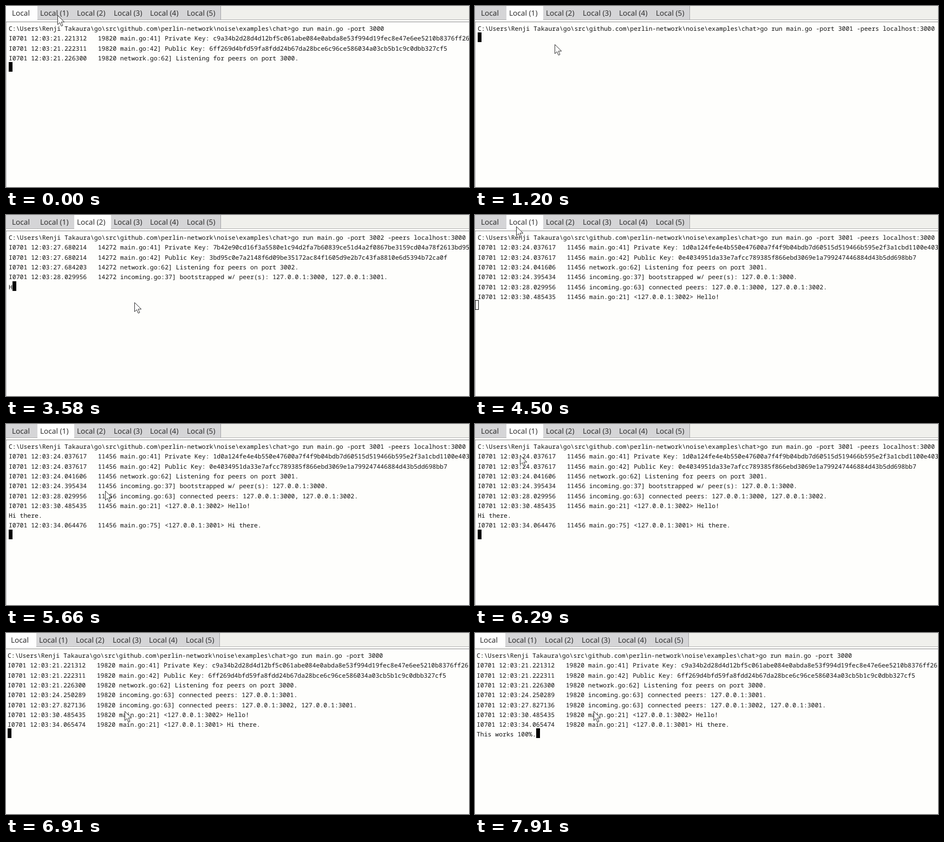
Write an HTML page with a canvas that moves like this. It is 855 by 336 pixels and loops after 8000 ms.

```html
<!DOCTYPE html>
<html lang="en">
<head>
<meta charset="utf-8">
<title>Terminal chat</title>
<style>
html, body { margin: 0; width: 100%; height: 100%; overflow: hidden; background: #fefefc; }
canvas { display: block; }
</style>
</head>
<body>
<canvas id="stage" width="855" height="336"></canvas>
<script>
const ctx = document.getElementById('stage').getContext('2d');
const LOOP = 8000, CELL = 6.868, ROW = 18.3, LEFT = 5, TOP = 30;
const MONO = `${CELL / 0.6}px "Noto Sans Mono", monospace`;
const SANS = '13.6px "Noto Sans", sans-serif';
const PROMPT = 'C:\\Users\\Renji Takaura\\go\\src\\github.com\\perlin-network\\noise\\examples\\chat>';
const TAB_EDGES = [0, 58, 126, 194, 261, 329, 396];

const log = (at, time, pid, text) => ({ at, text: `I0701 12:03:${time}   ${pid} ${text}` });
// keys: [time, characters typed so far]; the line is entered at `enter`
const typed = (at, prefix, text, keys, enter) => ({ at, prefix, text, keys, enter });
const command = (port, shown, enter) => typed(-1, PROMPT,
  `go run main.go -port ${port}${port > 3000 ? ' -peers localhost:3000' : ''}`,
  [[shown - 1, 0], [shown, 99]], enter);

const terminals = [
  [
    command(3000, -2, -1),
    log(-1, '21.221312', 19820, 'main.go:41] Private Key: c9a34b2d28d4d12bf5c061abe084e0abda8e53f994d19fec8e47e6ee5210b8376ff26'),
    log(-1, '21.222311', 19820, 'main.go:42] Public Key: 6ff269d4bfd59fa8fdd24b67da28bce6c96ce586034a03cb5b1c9c0dbb327cf5'),
    log(-1, '21.226300', 19820, 'network.go:62] Listening for peers on port 3000.'),
    log(1400, '24.250289', 19820, 'incoming.go:63] connected peers: 127.0.0.1:3001.'),
    log(2870, '27.827136', 19820, 'incoming.go:63] connected peers: 127.0.0.1:3002, 127.0.0.1:3001.'),
    log(3990, '30.485435', 19820, 'main.go:21] <127.0.0.1:3002> Hello!'),
    log(5650, '34.065474', 19820, 'main.go:21] <127.0.0.1:3001> Hi there.'),
    typed(7000, '', 'This works 100%.', [[7080, 0], [7120, 1], [7535, 10], [7615, 11], [7905, 16]], LOOP)
  ],
  [
    command(3001, 700, 950),
    log(1330, '24.037617', 11456, 'main.go:41] Private Key: 1d0a124fe4e4b550e47600a7f4f9b04bdb7d60515d519466b595e2f3a1cbd1100e403'),
    log(1330, '24.037617', 11456, 'main.go:42] Public Key: 0e4034951da33e7afcc789385f866ebd3069e1a799247446884d43b5dd698bb7'),
    log(1330, '24.041606', 11456, 'network.go:62] Listening for peers on port 3001.'),
    log(1490, '24.395434', 11456, 'incoming.go:37] bootstrapped w/ peer(s): 127.0.0.1:3000.'),
    log(2870, '28.029956', 11456, 'incoming.go:63] connected peers: 127.0.0.1:3000, 127.0.0.1:3002.'),
    log(3990, '30.485435', 11456, 'main.go:21] <127.0.0.1:3002> Hello!'),
    typed(5290, '', 'Hi there.', [[5290, 0], [5330, 1], [5570, 9]], 5610),
    log(5650, '34.064476', 11456, 'main.go:75] <127.0.0.1:3001> Hi there.')
  ],
  [
    command(3002, 1950, 2190),
    log(2660, '27.680214', 14272, 'main.go:41] Private Key: 7b42e90cd16f3a5580e1c94d2fa7b60839ce51d4a2f0867be3159cd04a78f2613bd95'),
    log(2660, '27.680214', 14272, 'main.go:42] Public Key: 3bd95c0e7a2148f6d09be35172ac84f1605d9e2b7c43fa8810e6d5394b72ca0f'),
    log(2660, '27.684203', 14272, 'network.go:62] Listening for peers on port 3002.'),
    log(2870, '28.029956', 14272, 'incoming.go:37] bootstrapped w/ peer(s): 127.0.0.1:3000, 127.0.0.1:3001.'),
    typed(3540, '', 'Hello!', [[3540, 0], [3580, 1], [3860, 6]], 3940),
    log(3990, '30.485435', 14272, 'main.go:75] <127.0.0.1:3002> Hello!')
  ]
];

const switches = [[0, 0], [200, 1], [1700, 2], [4440, 1], [6750, 0]];
const hiddenCursor = [[2500, 2660], [3160, 3330], [5910, 6200], [6500, 6750]];
const unfocused = [4440, 4560];
const pan = [[6400, 0], [6700, -2]];
const mouseX = [[200, 95], [500, 140], [950, 140], [1500, 155], [1740, 155], [2160, 240], [3130, 240],
  [3330, 237], [4250, 237], [4440, 76], [4510, 76], [4950, 183], [5900, 183], [6500, 29], [6750, 29], [6900, 219]];
const mouseY = [[200, 17], [500, 113], [950, 113], [1500, 20], [1740, 20], [2160, 118], [3130, 118],
  [3330, 162], [4250, 162], [4440, 21], [4510, 21], [4950, 124], [5900, 124], [6500, 23], [6750, 23], [6900, 145]];

function track(points, t) {
  const next = points.findIndex(p => p[0] > t);
  if (next === 0) return points[0][1];
  if (next < 0) return points[points.length - 1][1];
  const [t0, a] = points[next - 1], [t1, b] = points[next];
  return a + (b - a) * (t - t0) / (t1 - t0);
}
const within = ([start, end], t) => t >= start && t < end;

function rect(color, x, y, w, h) {
  ctx.fillStyle = color;
  ctx.fillRect(x, y, w, h);
}

function drawTabs(active) {
  rect('#f0f0ec', 396, 0, 470, 25);
  rect('#b2b2b2', 0, 25, 866, 1);
  ctx.font = SANS;
  for (let i = 0; i < 6; i++) {
    const x = TAB_EDGES[i], end = TAB_EDGES[i + 1];
    rect(i === active ? '#fefefe' : '#d5d5d7', x, 0, end - x, i === active ? 26 : 25);
    rect('#a5a5a8', end, 0, 1, 26);
    ctx.fillStyle = '#303030';
    ctx.fillText(i ? `Local (${i})` : 'Local', i ? x + 5 : 11, 17.5);
  }
  rect('#8c8c8c', 0, 29, 866, 1);
  rect('#bdbdbd', 0, 30, 1, 306);
}

function drawTerminal(lines, t) {
  let row = 0, column = 0;
  ctx.font = MONO;
  ctx.fillStyle = '#111';
  for (const { at, text, prefix = '', keys, enter } of lines) {
    if (t < at) continue;
    const count = keys ? Math.floor(track(keys, t) + 0.001) : text.length;
    const shown = prefix + text.slice(0, count);
    ctx.fillText(shown, LEFT, TOP + 16 + row * ROW);
    if (keys && t < enter) column = shown.length;
    else row++;
  }
  const x = Math.round(LEFT + column * CELL), y = Math.round(TOP + row * ROW);
  if (within(unfocused, t)) {
    ctx.strokeStyle = '#111';
    ctx.lineWidth = 1;
    ctx.strokeRect(x - 4.5, y + 0.5, 6, 17);
  } else if (!hiddenCursor.some(span => within(span, t))) {
    rect('#000', x, y + 1, 7, 18);
  }
}

const arrow = new Path2D('M.5 .5V17.5L4.4 13.8 7.2 20.3 9.9 19.1 7.1 12.8H12.8Z');
function drawMouse(t) {
  ctx.save();
  ctx.translate(Math.round(track(mouseX, t)), Math.round(track(mouseY, t)));
  ctx.fillStyle = '#fff';
  ctx.fill(arrow);
  ctx.strokeStyle = '#333';
  ctx.lineWidth = 1;
  ctx.stroke(arrow);
  ctx.restore();
}

function draw(now) {
  const t = now % LOOP;
  const active = switches.filter(([at]) => at <= t).pop()[1];
  ctx.textRendering = 'geometricPrecision';
  rect('#fefefc', 0, 0, 855, 336);
  ctx.save();
  ctx.translate(Math.round(track(pan, t)), 0);
  drawTabs(active);
  drawTerminal(terminals[active], t);
  ctx.restore();
  drawMouse(t);
}

let start;
function tick(now) {
  start ??= now;
  draw(now - start);
  requestAnimationFrame(tick);
}
requestAnimationFrame(tick);
</script>
</body>
</html>
```
